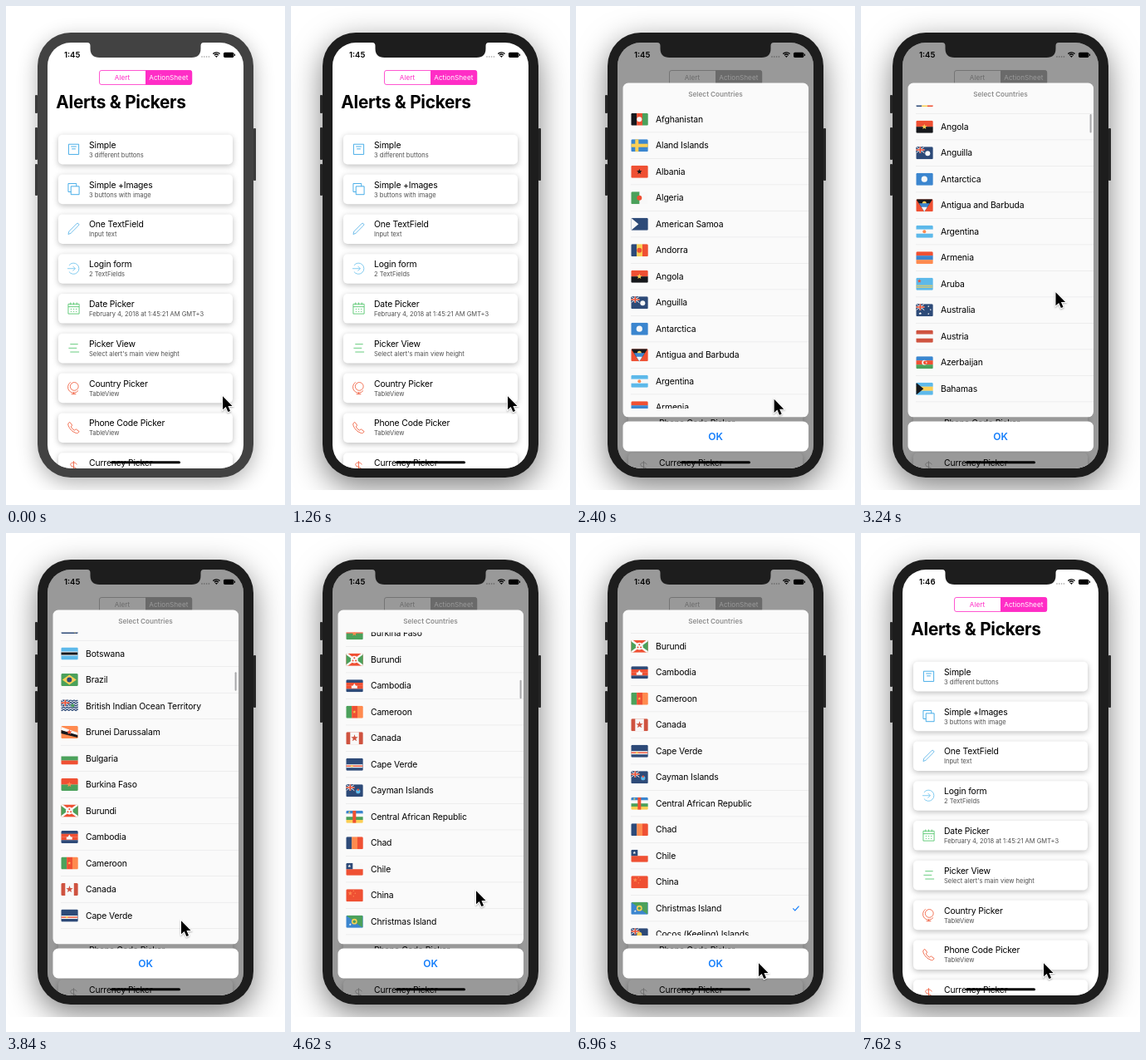
Animation, 336 px wide and 600 px high, one loop 7.86 s. Source, as an HTML page with a canvas:

```html
<!DOCTYPE html>
<html lang="en">
<head>
<meta charset="utf-8">
<title>Alerts &amp; Pickers</title>
<style>
html, body { margin: 0; width: 100%; height: 100%; overflow: hidden; background: #fff; }
canvas { display: block; width: 336px; height: 600px; }
</style>
</head>
<body>
<canvas id="stage"></canvas>
<script>
const LOOP = 7860, STEP = 60, ROW = 31.5;
const canvas = document.getElementById('stage'), g = canvas.getContext('2d');
const dpr = window.devicePixelRatio || 1;
canvas.width = 336 * dpr;
canvas.height = 600 * dpr;

const BLUE = [42, 160, 228], GREEN = [76, 196, 104], ORANGE = [240, 91, 58], PINK = [255, 45, 198];
const cards = [
  ['Simple', '3 different buttons', BLUE, 'M1.5 1.5h13v13h-13zM4.5 4.5h7M5.5 7.5h5'],
  ['Simple +Images', '3 buttons with image', BLUE, 'M4.5 4.5h10.5v10.5h-10.5zM4.5 11.5h-3.5v-10.5h10.5v3.5'],
  ['One TextField', 'Input text', [90, 180, 232], 'M1 15l1-3.8 9.8-9.8q1.2-1 2.4 0t0 2.4l-9.8 9.8z'],
  ['Login form', '2 TextFields', [110, 195, 238], 'M2 4a7 7 0 1 1 0 8M0 8h10M7 5l3 3-3 3'],
  ['Date Picker', 'February 4, 2018 at 1:45:21 AM GMT+3', GREEN,
    'M1 2.5h14v12.5h-14zM1 6h14M4 .5v3M8 .5v3M12 .5v3M4 9h1.5M7.3 9h1.5M10.6 9h1.5M4 12h1.5M7.3 12h1.5M10.6 12h1.5'],
  ['Picker View', "Select alert's main view height", GREEN, 'M3.5 3h10M1.5 8h10.5M3.5 13h11.5'],
  ['Country Picker', 'TableView', ORANGE, 'M14 6.2a5.2 5.2 0 1 1-10.4 0a5.2 5.2 0 1 1 10.4 0M4 .8a7.4 7.4 0 1 0 9.8 10.8M8 13.5v2.5M5 16h6'],
  ['Phone Code Picker', 'TableView', ORANGE,
    'M3 1l3 4-1.5 2a10 10 0 0 0 4.5 4.5l2-1.5 4 3c-1 2-2.5 2.5-4 2a16 16 0 0 1-10-10c-.5-1.5 0-3 2-4z'],
  ['Currency Picker', 'TableView', ORANGE, 'M12 4.5c-1-3.5-8-3.5-8 0s8 3 8 6.5-7 3.5-8 0M8 0v16'],
];

// Flag recipes: a shape letter, a colour letter, then optional coordinates.
const countries = `Afghanistan|vKRG oW
Aland Islands|hB cY
Albania|hR sK
Algeria|vGW oR
American Samoa|hN tW
Andorra|vNYR oR
Angola|hRK sY
Anguilla|hN u oW14,8,3
Antarctica|hB oW10,7.5,3.6
Antigua and Barbuda|hR pK0,0,20,0,10,15 oY10,5,2.5 pB3.5,5,16.5,5,10,15 pW6.5,9.5,13.5,9.5,10,15
Argentina|hSWS oO10,7.5,2
Armenia|hRBO
Aruba|hS rY0,9,20,1 rY0,11,20,1 sR4,4,2.5
Australia|hN u sW5,11.5,2 sW15,3,1.3 sW15,12,1.3 sW17.5,7,1.2
Austria|hDWD
Azerbaijan|hBRG oW oR11,7.5,2.3 sW12.4,7.5,1.3
Bahamas|hSYS tK
Bahrain|vWRR
Bangladesh|hG oR
Barbados|vNYN sK
Belarus|hRRG
Belgium|vKYR
Belize|hN oW
Benin|hYR rG0,0,8,15
Bermuda|hR u oW14,8,3
Bhutan|hO pY0,0,20,0,0,15 oW
Bolivia|hRYG
Bosnia and Herzegovina|hN pY6,0,17,0,17,15
Botswana|hS rW0,5,20,5 rK0,6,20,3
Brazil|hG dY oN
British Indian Ocean Territory|hW wN u oG14,7,2
Brunei Darussalam|hO pW0,1,20,8,20,12,0,5 pK0,5,20,11,20,14,0,9 sR
Bulgaria|hWGR
Burkina Faso|hRG sO
Burundi|hR tG mG xW oW10,7.5,4.4 oR10,5.5,1 oR8.2,8.8,1 oR11.8,8.8,1
Cambodia|hNRRN rW6.5,7.5,7,3 pW8,8,10,4.5,12,8
Cameroon|vGRO sY10,7.5,2
Canada|hD rW5,0,10.5,15 sD10.2,7.5,4.4
Cape Verde|hN rW0,7.5,20,4 rR0,8.8,20,1.4 oY7,9.5,1.2
Cayman Islands|hN u oS14.5,8.5,2.6 oR14.5,6.5,1.2
Central African Republic|hBWGY rR8,0,4,15 sY4,2,1.6
Chad|vNOR
Chile|hWR rN0,0,8,7.5 sW4,3.8,2
China|hR sO5,5,2.8 oO9,2,.7 oO11,5,.7 oO9,8.5,.7
Christmas Island|hB pG0,0,20,0,20,15 oY10,7.5,3.4 oG10,7.5,1.8 sW5,11,1.6
Cocos (Keeling) Islands|hN u oY`.split('\n').map(line => line.split('|'));
const paint = { R: '#ef5033', D: '#cf5340', W: '#f8f8f8', N: '#2d4a78', B: '#3b86cf', S: '#5db9ea', G: '#4ba15b', Y: '#fbcf55', K: '#16181c', O: '#ff8a4f' };

const scrollKeys = [[2640, 0], [2940, 150], [3120, 150], [3240, 180], [3960, 893], [4200, 893], [4800, 1071]];
const cursorKeys = [[1440, 260, 468], [1920, 252, 470], [2280, 243, 471], [2460, 235, 472], [2640, 235, 472], [2940, 235, 345],
  [3120, 235, 345], [3240, 233.5, 343], [3840, 210, 465], [3960, 209, 471], [4200, 214, 525], [4440, 221, 430], [4620, 222, 429],
  [5460, 222, 429], [5640, 222.5, 422.5], [6000, 222.5, 422.5], [6300, 221.5, 451], [6600, 221.5, 451], [6960, 219, 516]];

const clamp = x => Math.min(1, Math.max(0, x));
const ramp = (t, a, b) => clamp((t - a) / (b - a));
const easeOut = p => 1 - (1 - p) ** 2;
const mix = (a, b, p) => a + (b - a) * p;
const rgb = (c, to, p) => `rgb(${c.map((v, i) => mix(v, to[i], p)).join()})`;

function track(keys, t, ease = p => p) {
  let i = keys.findIndex(k => k[0] > t);
  if (i < 0) i = keys.length;
  const a = keys[Math.max(0, i - 1)], b = keys[Math.min(i, keys.length - 1)];
  const p = a === b ? 0 : ease(ramp(t, a[0], b[0]));
  return a.slice(1).map((v, n) => mix(v, b[n + 1], p));
}

function box(x, y, w, h, r, fill) {
  g.beginPath();
  g.roundRect(x, y, w, h, r);
  if (fill) { g.fillStyle = fill; g.fill(); }
}

function shadow(color, blur = 0, y = 0) {
  g.shadowColor = color;
  g.shadowBlur = blur * dpr;
  g.shadowOffsetY = y * dpr;
}

// y is the middle of the capital letters
function text(s, x, y, size, { color = '#000', weight = 400, align = 'left', gap = 0 } = {}) {
  g.font = `${weight} ${size}px Inter, sans-serif`;
  g.letterSpacing = gap + 'px';
  g.textAlign = align;
  g.fillStyle = color;
  g.fillText(s, x, y + size * 0.36);
}

function poly(points) {
  g.beginPath();
  for (let i = 0; i < points.length; i += 2) g.lineTo(points[i], points[i + 1]);
  g.closePath();
}

function lines(d, color, width) {
  g.strokeStyle = color;
  g.lineWidth = width;
  g.stroke(new Path2D(d));
}

const shapes = {
  r: (x, y, w, h) => g.fillRect(x, y, w, h),
  o(x = 10, y = 7.5, r = 3) { g.beginPath(); g.arc(x, y, r, 0, 7); g.fill(); },
  s(x = 10, y = 7.5, r = 3.4) {
    poly([...Array(10).keys()].flatMap(i => {
      const a = i * Math.PI / 5, q = i % 2 ? r * 0.42 : r;
      return [x + q * Math.sin(a), y - q * Math.cos(a)];
    }));
    g.fill();
  },
  p(...points) { poly(points); g.fill(); },
  t: () => shapes.p(0, 0, 9, 7.5, 0, 15),
  m: () => shapes.p(20.5, 0, 11, 7.5, 20.5, 15),
  d: () => shapes.p(1.5, 7.5, 10, 1.5, 18.5, 7.5, 10, 13.5),
  c() { g.fillRect(5, 0, 4, 15); g.fillRect(0, 5.5, 20.5, 4); },
  x: () => lines('M0 0L20.5 15M20.5 0L0 15', g.fillStyle, 2.4),
  w() {
    for (let y = 1; y < 15; y += 2.8) {
      g.beginPath();
      for (let x = 0; x <= 21; x++) g.lineTo(x, y + 0.8 * Math.sin(x * 1.5));
      g.strokeStyle = g.fillStyle;
      g.lineWidth = 1.3;
      g.stroke();
    }
  },
};

function flag(recipe, x, y) {
  g.save();
  g.translate(x, y);
  box(0, 0, 20.5, 15, 1.5);
  g.clip();
  for (const op of recipe.split(' ')) {
    const kind = op[0];
    if (kind === 'h' || kind === 'v') {
      const n = op.length - 1, w = 20.5 / n, h = 15 / n;
      [...op.slice(1)].forEach((c, i) => {
        g.fillStyle = paint[c];
        kind === 'h' ? g.fillRect(0, i * h, 20.5, h + 0.1) : g.fillRect(i * w, 0, w + 0.1, 15);
      });
    } else if (kind === 'u') {
      g.fillStyle = paint.N;
      g.fillRect(0, 0, 10, 7.5);
      lines('M0 0L10 7.5M10 0L0 7.5', paint.W, 1);
      lines('M5 0V7.5M0 3.75H10', paint.W, 2);
      lines('M5 0V7.5M0 3.75H10', paint.R, 1.4);
    } else {
      g.fillStyle = paint[op[1]];
      shapes[kind](...(op.length > 2 ? op.slice(2).split(',').map(Number) : []));
    }
  }
  g.restore();
}

function drawPage(t, dim) {
  const gray = [176, 176, 176], pink = rgb(PINK, gray, dim);
  g.fillStyle = '#fff';
  g.fillRect(50, 44, 236, 512);
  text('Alerts & Pickers', 60.3, 115.8, 20.8, { weight: 700, gap: -0.28 });

  box(112.5, 77.5, 111.3, 17, 2.5);
  g.strokeStyle = pink;
  g.lineWidth = 0.8;
  g.stroke();
  box(168, 77.3, 56, 17.4, [0, 2.5, 2.5, 0], pink);
  text('Alert', 140, 86, 8.2, { color: pink, align: 'center' });
  text('ActionSheet', 195.8, 86, 8.2, { color: '#fff', align: 'center' });

  cards.forEach(([title, note, color, icon], i) => {
    const y = 154.8 + i * 47.8;
    shadow('rgba(0,0,0,.26)', 7, 2);
    box(63, y, 210, 35.6, 5, '#fff');
    shadow('transparent');
    g.save();
    g.translate(74, y + 10);
    g.scale(0.94, 0.94);
    lines(icon, rgb(color, gray, dim), 0.9);
    g.restore();
    text(title, 100, y + 12.2, 10.4, { gap: -0.15 });
    text(note, 100, y + 24.2, 7.55, { color: '#505050' });
  });

  text(t < 4920 ? '1:45' : '1:46', 70, 59, 9.6, { weight: 600 });
  g.fillStyle = '#999';
  for (let i = 0; i < 4; i++) shapes.o(236 + i * 2.8, 61, 0.8);
  g.strokeStyle = g.fillStyle = '#000';
  g.lineWidth = 1.4;
  for (const r of [3.5, 5.9]) {
    g.beginPath();
    g.arc(253.4, 61.8, r, -2.35, -0.8);
    g.stroke();
  }
  shapes.p(253.4, 62, 251.7, 60, 255.1, 60);
  box(262, 55.7, 12.4, 6.2, 1.6, '#000');
  box(275, 57.5, 1, 2.6, 0.5, '#000');
}

function drawSheet(t) {
  const slide = t < 3000 ? 175 * (1 - easeOut(ramp(t, 1440, 1800))) : 475 * ramp(t, 7140, 7500) ** 1.4;
  const grow = ramp(t, 1920, 2280), top = mix(393, 92.5, easeOut(grow));
  const scroll = track(scrollKeys, t, easeOut)[0], loaded = grow > 0;
  g.save();
  g.translate(0, slide);
  box(56.5, 499.5, 223.5, 36, 6.5, '#fff');
  text('OK', 168, 517.7, 12, { color: '#147efb', weight: 600, align: 'center' });
  box(56.5, top, 223.5, 494.3 - top, 6.5, '#fafafa');
  text('Select Countries', 168, top + 14, 8.2, { color: '#8e8e8e', weight: 600, align: 'center' });

  g.beginPath();
  g.rect(56.5, top + 27, 223.5, 484 - top - 27);
  g.clip();
  countries.forEach(([name, recipe], i) => {
    const y = top + 43.7 + i * ROW - scroll;
    if (y < top || y > 502) return;
    if (loaded) flag(recipe, 66.3, y - 7.5);
    text(name, loaded ? 96 : 66, y, 10.4, { gap: -0.15 });
    g.fillStyle = '#e4e4e5';
    g.fillRect(66, y + 15.4, 214, 0.6);
    const chosen = t >= 6480 ? 'Christmas Island' : t >= 5880 ? 'China' : '';
    if (name === chosen) lines(`M261.3 ${y + 0.2}l2.5 2.5 4.7-5.2`, '#147efb', 1.2);
  });
  if (t >= 2700 && t < 4980) {
    g.globalAlpha = t < 4920 ? 1 : 0.4;
    box(275.6, 120.5 + scroll * 0.0534, 2, 22.5, 1, '#a8a8aa');
  }
  g.restore();
}

function drawPhone(t) {
  const focus = t < 1200 ? 0 : t < 1260 ? 0.5 : 1;
  const body = rgb([66, 66, 66], [29, 29, 29], focus);
  const edge = rgb([58, 58, 58], [38, 38, 38], focus);
  g.save();
  g.beginPath();
  g.rect(0, 0, 336, 582);
  g.clip();
  shadow(`rgba(0,0,0,${mix(0.3, 0.5, focus)})`, mix(24, 36, focus), mix(7, 11, focus));
  box(38, 32, 260, 535, 40, body);
  shadow('transparent');
  g.restore();
  for (const [x, y, h] of [[35, 107, 22], [35, 146, 39], [35, 190, 38], [298, 147, 63]]) box(x, y, 3, h, 1, edge);

  const dim = t < 3000 ? ramp(t, 1440, 1800) : 1 - ramp(t, 7140, 7560);
  g.save();
  box(50, 44, 236, 512, 28);
  g.clip();
  drawPage(t, dim);
  g.fillStyle = `rgba(0,0,0,${0.4 * dim})`;
  g.fillRect(50, 44, 236, 512);
  if (t >= 1500 && t < 7500) drawSheet(t);
  box(126, 547.3, 84, 3, 1.5, '#000');
  g.fillStyle = body;
  g.fill(new Path2D('M98 43h140v1q-3.5 0-3.5 4v3q0 11-11 11h-111q-11 0-11-11v-3q0-4-3.5-4z'));
  g.restore();
}

function drawCursor(t) {
  const [x, y] = track(cursorKeys, t);
  g.save();
  g.translate(x + 1, y + 1.2);
  g.scale(0.98, 0.98);
  poly([0, 0, 0, 16.5, 3.8, 13, 6.5, 19.3, 9.2, 18.1, 6.6, 12, 11.8, 12]);
  shadow('rgba(0,0,0,.3)', 2, 1);
  g.strokeStyle = '#fff';
  g.lineWidth = 2;
  g.stroke();
  shadow('transparent');
  g.fillStyle = '#000';
  g.fill();
  g.restore();
}

const start = performance.now();
function frame(now) {
  const t = Math.floor((Math.max(0, now - start) % LOOP) / STEP) * STEP;
  g.setTransform(dpr, 0, 0, dpr, 0, 0);
  g.fillStyle = '#fff';
  g.fillRect(0, 0, 336, 600);
  drawPhone(t);
  drawCursor(t);
  requestAnimationFrame(frame);
}
frame(start);
</script>
</body>
</html>
```
